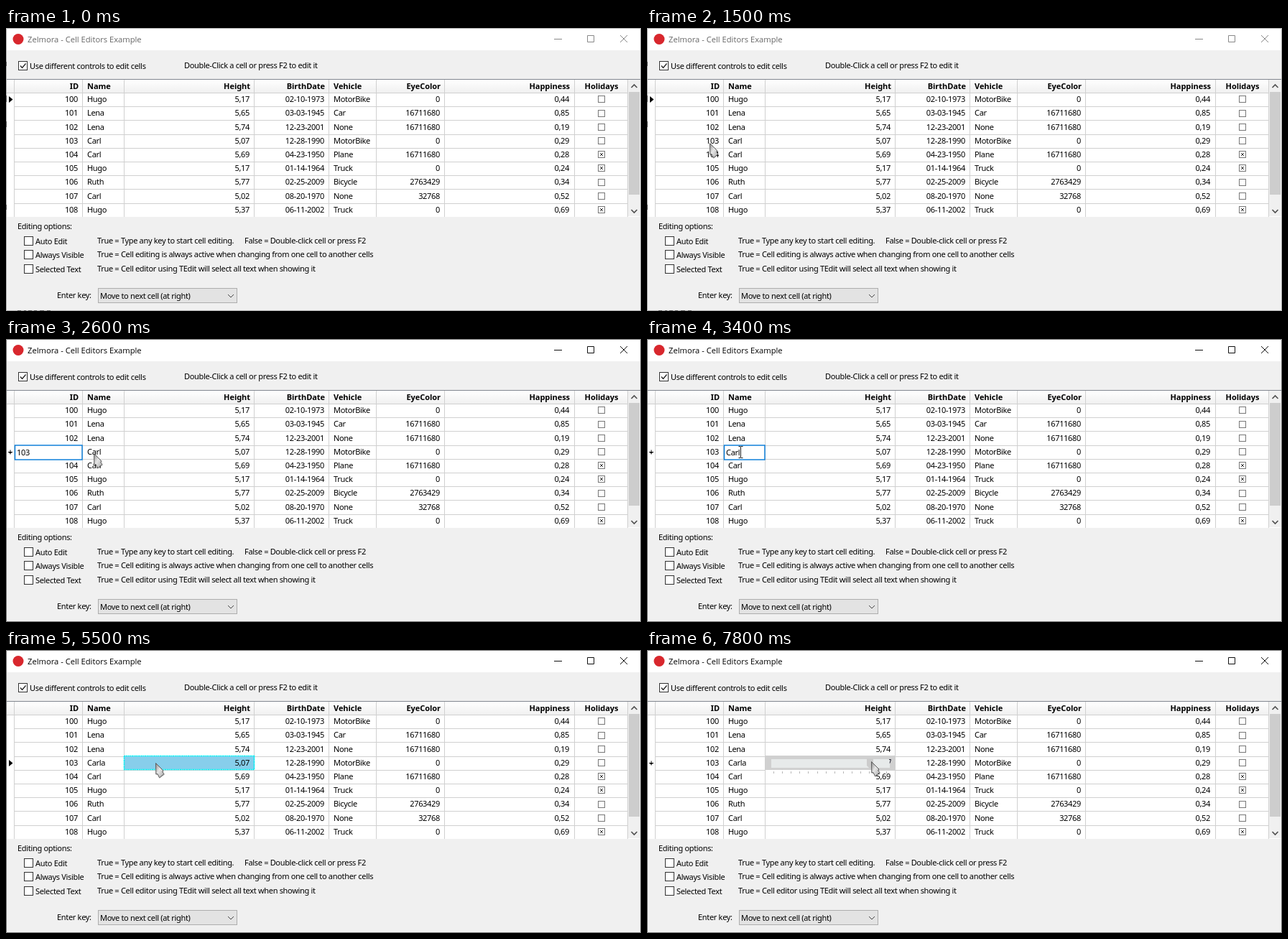
These frames come from a looping animation (884 px wide and 394 px high, 8 s). An HTML page:

```html
<!DOCTYPE html>
<html lang="en">
<head>
<meta charset="utf-8">
<title>Cell Editors Example</title>
<style>
  html, body { margin: 0; width: 100%; height: 100%; overflow: hidden; background: #f0f0f0; }
  svg { display: block; width: 884px; height: 394px; }
  text { font: 11px "Noto Sans", "Open Sans", sans-serif; letter-spacing: -0.32px; white-space: pre; }
  .head { font-weight: 700; letter-spacing: -0.05px; }
  .title { font: 11.2px "Open Sans", "Noto Sans", sans-serif; letter-spacing: 0; }
</style>
</head>
<body>
<svg id="stage" viewBox="0 0 884 394" xmlns="http://www.w3.org/2000/svg">
  <defs>
    <linearGradient id="headFill" x2="0" y2="1">
      <stop stop-color="#fff"/><stop offset="1" stop-color="#f0f0f0"/>
    </linearGradient>
    <linearGradient id="arrowFill" x2="1" y2="1">
      <stop stop-color="#8c8c8c"/><stop offset=".45" stop-color="#e6e6e6"/><stop offset="1" stop-color="#a8a8a8"/>
    </linearGradient>
  </defs>
  <g id="base"></g>
  <g id="select">
    <rect id="selFill" y="148" height="18" fill="#87ceeb"/>
    <rect id="selLine" y="147.5" height="19" fill="none" stroke="#00f0f5" stroke-width="1.6" stroke-dasharray="2 .6"/>
  </g>
  <g id="cells"></g>
  <g id="edit">
    <rect id="editBox" y="148" height="20" fill="#fff" stroke="#0078d7" stroke-width="1.4"/>
    <text id="editText" y="162"></text>
    <rect id="caret" y="151" width="1" height="14"/>
  </g>
  <g id="slider">
    <rect x="165" y="147" width="181" height="20" fill="#d0d0d0"/>
    <rect x="165" y="167" width="152" height="6" fill="#fff"/>
    <rect x="173" y="152" width="165" height="12" fill="#e7eaea"/>
    <path id="ticks" stroke="#b8b8b8" fill="none"/>
    <path d="M337 152.5h2.5l-1.5 5" fill="none" stroke="#223"/>
    <path id="thumb" d="M0 151h9v10l-4.5 4.5-4.5-4.5z"/>
  </g>
  <path id="pointer"/>
  <path id="plus" d="M3 157.5h6M6 154.5v6M4.5 158.5h3" fill="none" stroke="#000"/>
  <g id="frame"></g>
  <g id="arrow">
    <path d="M1 1.5L12 12.5 10.5 13.5 13 16.5 6 21.8 3.5 16.5 1.5 16.8z" fill="#000" opacity=".25"/>
    <path d="M.5.5L11 11 9.5 12.5 12 15.5 5.5 20.8 3 15.5.8 16z" fill="url(#arrowFill)" stroke="#5c5c5c" stroke-linejoin="round"/>
  </g>
  <path id="beam" d="M-3 .5h2.5l.5.5.5-.5h2.5M0 1v15M-3 16.5h2.5l.5-.5.5.5h2.5" fill="none" stroke="#222"/>
</svg>
<script>
const $ = id => document.getElementById(id);

function add(parent, tag, attrs, content) {
  const el = document.createElementNS('http://www.w3.org/2000/svg', tag);
  for (const key in attrs) el.setAttribute(key, attrs[key]);
  if (content !== undefined) el.textContent = content;
  return $(parent).appendChild(el);
}
const set = (el, attrs) => { for (const key in attrs) el.setAttribute(key, attrs[key]); };
const rect = (x, y, width, height, fill, stroke = 'none') =>
  add('base', 'rect', { x, y, width, height, fill, stroke });
const line = (d, stroke, parent = 'base', width = 1) =>
  add(parent, 'path', { d, stroke, fill: 'none', 'stroke-width': width });
const label = (x, y, text, cls = '', anchor = 'start', parent = 'base') =>
  add(parent, 'text', { x, y, class: cls, 'text-anchor': anchor }, text);

// Title bar
rect(0, 0, 884, 394, '#f0f0f0');
rect(0, 0, 884, 31, '#fff');
add('base', 'circle', { cx: 17, cy: 15.5, r: 7.5, fill: '#d8272d' });
const title = label(30, 20, 'Zelmora - Cell Editors Example', 'title');
const buttons = line('M763 15.5h11M809.5 10.5h9v9h-9zM855 10l10 10M865 10l-10 10');

// Options
function check(x, y, text) {
  rect(x + .5, y + .5, 12, 12, '#fff', '#333');
  label(x + 16, y + 11, text);
}
check(17, 46, 'Use different controls to edit cells');
line('M20 52.5l2.5 3 5-6', '#222', 'base', 1.3);
label(248, 56, 'Double-Click a cell or press F2 to edit it');
label(16, 280, 'Editing options:');
[
  ['Auto Edit', 'True = Type any key to start cell editing.'],
  ['Always Visible', 'True = Cell editing is always active when changing from one cell to another cells'],
  ['Selected Text', 'True = Cell editor using TEdit will select all text when showing it']
].forEach(([name, note], i) => {
  const y = Math.floor(290 + i * 19.5);
  check(25, y, name);
  label(127, y + 10, note);
});
label(332, 300, 'False = Double-click cell or press F2');
label(71, 376, 'Enter key:');
rect(128.5, 362.5, 193, 20, '#e3e3e3', '#adadad');
label(131, 377, 'Move to next cell (at right)');
line('M309 371l4 4 4-4', '#444');

// Grid
const pitch = 19.2;
const rowAt = (y, i) => Math.round(y + i * pitch);
rect(1, 71, 882, 192, '#fff');
rect(1, 72, 865, 18, 'url(#headFill)');
for (let i = 0; i < 9; i++) line(`M${i ? 11 : 1} ${rowAt(89.9, i) + .5}H866`, '#d0d0d0');
[11, 106, 164, 345, 449, 515, 610, 791, 865].forEach(x => line(`M${x + .5} 72V263`, '#d0d0d0'));
line('M1 71.5H883', '#828790');
rect(866, 72, 17, 190, '#f0f0f0');
rect(867, 89, 15, 143, '#cdcdcd');
line('M870.5 83l4-4 4 4M870.5 253l4 4 4-4', '#505050', 'base', 1.6);

const columns = [
  ['ID', 100, 'end'], ['Name', 113, 'start'], ['Height', 339, 'end'], ['BirthDate', 443, 'end'],
  ['Vehicle', 456, 'start'], ['EyeColor', 604, 'end'], ['Happiness', 784, 'end'], ['Holidays', 829, 'middle']
];
const rows = `Hugo 5,17 02-10-1973 MotorBike 0 0,44
Lena 5,65 03-03-1945 Car 16711680 0,85
Lena 5,74 12-23-2001 None 16711680 0,19
Carl 5,07 12-28-1990 MotorBike 0 0,29
Carl 5,69 04-23-1950 Plane 16711680 0,28 x
Hugo 5,17 01-14-1964 Truck 0 0,24 x
Ruth 5,77 02-25-2009 Bicycle 2763429 0,34
Carl 5,02 08-20-1970 None 32768 0,52
Hugo 5,37 06-11-2002 Truck 0 0,69 x`.split('\n').map(r => r.split(' '));

columns.forEach(([name, x, anchor]) => label(x + (anchor === 'end' ? 1 : 0), 85, name, 'head', anchor));
let editedName;
rows.forEach((row, i) => {
  const base = rowAt(103.1, i), mid = rowAt(99.4, i);
  [100 + i, ...row.slice(0, 6)].forEach((value, c) => {
    const cell = label(columns[c][1], base, value, '', columns[c][2], 'cells');
    if (i === 3 && c === 1) editedName = cell;
  });
  add('cells', 'rect', { x: 824.5, y: mid - 4.5, width: 9, height: 9, fill: '#fff', stroke: '#777' });
  if (row[6]) line(`M827 ${mid - 2}l4 4M831 ${mid - 2}l-4 4`, '#333', 'cells');
});

let ticks = '';
for (let i = 0; i < 14; i++) ticks += `M${Math.round(176 + i * 12.1) + .5} 169v3`;
set($('ticks'), { d: ticks });

// Window edge, with bits of what lies behind while inactive
const edge = line('M.5.5H883.5V393.5H.5z', '#707070', 'frame');
const behind = line('M.5 47v6M.5 94v9M.5 130v8M.5 246v7M16 393.5h5m4 0h3m3 0h5m3 0h4m4 0h6m4 0h5', '#555', 'frame');

// Mouse: time, x, y
const path = [
  [500, 604, 318], [700, 510, 284], [1000, 250, 208], [1300, 98, 162], [1500, 87, 160],
  [2300, 87, 160], [2600, 122, 159], [2900, 126, 158], [3100, 128, 157], [3300, 128, 157],
  [3600, 135, 157], [3700, 135, 157], [4100, 224, 157], [4200, 224, 157], [4300, 218, 157],
  [4500, 209, 157], [5200, 209, 157], [5300, 208, 157], [5500, 208, 157], [6000, 282, 159],
  [6100, 282, 159], [6200, 283, 159], [6700, 283, 159], [6800, 278, 161], [7100, 222, 161],
  [7600, 298, 160], [7800, 312, 155]
];
const thumbPath = [[6700, 286], [6800, 281], [7100, 221], [7600, 290], [7800, 306]];

// Stages of the edited row: start, kind, cell left, cell right
const stages = [
  [0, 'idle'], [1600, 'select', 11, 106], [2300, 'edit', 12, 106], [2900, 'select', 106, 164],
  [3100, 'edit', 107, 164], [5500, 'select', 164, 345], [6500, 'slide']
];

function at(table, t) {
  if (t <= table[0][0]) return table[0].slice(1);
  const i = table.findIndex(k => k[0] > t);
  if (i < 0) return table[table.length - 1].slice(1);
  const a = table[i - 1], b = table[i], f = (t - a[0]) / (b[0] - a[0]);
  return a.slice(1).map((v, n) => v + (b[n + 1] - v) * f);
}
const show = (el, on) => set(el, { visibility: on ? 'visible' : 'hidden' });
const between = (t, a, b) => t >= a && t < b;

function draw(time) {
  const t = Math.floor(time / 100) * 100;
  const active = t >= 1600;
  set(title, { fill: active ? '#000' : '#666' });
  set(buttons, { stroke: active ? '#111' : '#888' });
  set(edge, { stroke: active ? '#707070' : '#aaa' });
  show(behind, !active);

  const [, kind, left, right] = stages.filter(s => s[0] <= t).pop();
  const editing = kind === 'edit';
  show($('select'), kind === 'select');
  show($('edit'), editing);
  show($('slider'), kind === 'slide');
  show($('plus'), editing || kind === 'slide');
  show($('pointer'), kind === 'idle' || kind === 'select');
  set($('pointer'), { d: `M4 ${active ? 153 : 95}l5.5 4.5-5.5 4.5z` });
  editedName.textContent = t >= 5500 ? 'Carla' : 'Carl';

  if (kind === 'select') {
    set($('selFill'), { x: left + 1, width: right - left });
    set($('selLine'), { x: left + .5, width: right - left });
  }
  const caretOn = between(t, 3100, 3300) || between(t, 3600, 3800) || between(t, 4300, 4500) || between(t, 5000, 5500);
  show($('caret'), editing && caretOn);
  if (editing) {
    const text = $('editText');
    text.textContent = left < 100 ? '103' : t >= 5000 ? 'Carla' : 'Carl';
    set($('editBox'), { x: left + .5, width: right - left - .5 });
    set(text, { x: left + 3 });
    set($('caret'), { x: t < 3300 ? 110 : Math.round(left + 4 + text.getComputedTextLength()) });
  }
  if (kind === 'slide') {
    const [x] = at(thumbPath, t);
    set($('thumb'), { transform: `translate(${Math.round(x)} 0)`, fill: t < 6800 ? '#0078d7' : '#ccc' });
  }

  const [mx, my] = at(path, t).map(Math.round);
  const overText = editing && mx > left && mx < right;
  show($('arrow'), t >= 500 && !overText);
  show($('beam'), overText);
  set($('arrow'), { transform: `translate(${mx} ${my})` });
  set($('beam'), { transform: `translate(${mx + .5} ${my - 8})` });
}

const start = performance.now();
function tick() {
  draw((performance.now() - start) % 8000);
  requestAnimationFrame(tick);
}
tick();
</script>
</body>
</html>
```
